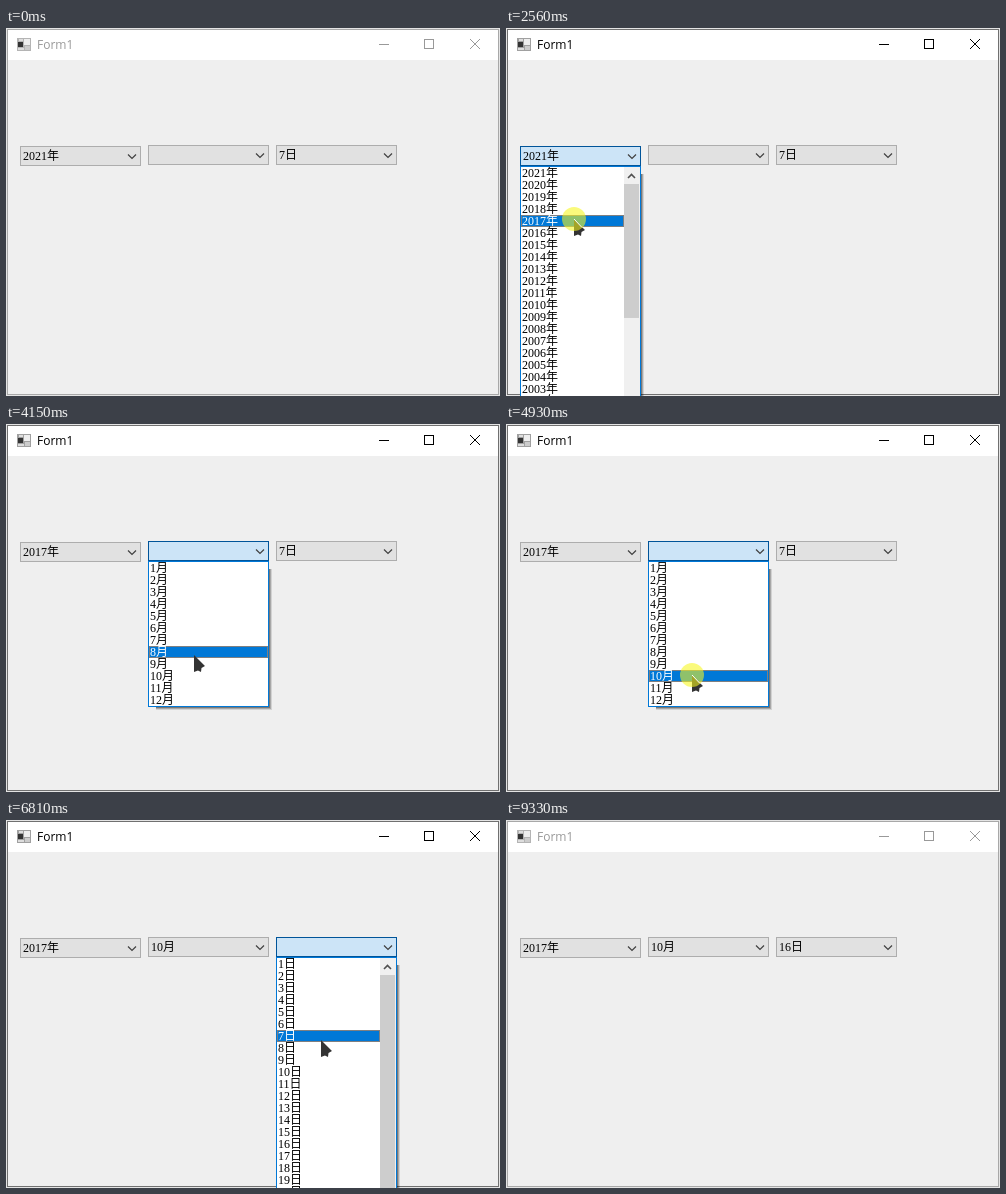
These frames come from a looping animation (494x368 px, 9.41 s). An HTML page with a canvas:

```html
<!DOCTYPE html>
<html lang="zh">
<head>
<meta charset="utf-8">
<title>Form1</title>
<style>
html, body { margin: 0; width: 100%; height: 100%; overflow: hidden; background: #efefef; }
canvas { display: block; width: 494px; height: 368px; }
</style>
</head>
<body>
<canvas id="stage" width="494" height="368"></canvas>
<script>
const g = document.getElementById('stage').getContext('2d');
const LOOP = 9410, ROW = 12, VISIBLE = 30, SLIDE = 200;
const BLUE = '#0078d7';
const TEXT_FONT = '12px "Liberation Serif", "Noto Sans CJK SC", "Noto Sans CJK", serif';
const TITLE_FONT = '12px "Open Sans", "Noto Sans", sans-serif';

const between = (t, from, to) => t >= from && t < to;
const items = (count, label) => Array.from({ length: count }, (_, i) => label(i));

const combos = [
  { x: 14, y: 118, items: items(73, i => 2021 - i + '年'), open: 1380, close: 2640, blur: 3270,
    text: t => t < 2640 ? '2021年' : '2017年', first: 0 },
  { x: 142, y: 117, items: items(12, i => i + 1 + '月'), open: 3270, close: 5010, blur: 6020,
    text: t => t < 5010 ? '' : '10月', first: -1 },
  { x: 270, y: 117, items: items(31, i => i + 1 + '日'), open: 5818, close: 7760, blur: 9330,
    text: t => t < 5010 ? '7日' : t < 7760 ? '' : '16日', first: -1 }
];

// Pointer stops: time, x, y
const path = [
  [160, 279, 306], [380, 158, 178], [540, 158, 178], [1000, 70, 128], [1380, 70, 128],
  [1780, 72, 216], [2030, 72, 216], [2170, 68, 191], [2640, 68, 191], [3040, 184, 127],
  [3600, 184, 127], [3970, 188, 231], [4150, 188, 231], [4450, 186, 251], [5010, 186, 251],
  [5640, 321, 129], [6280, 321, 129], [6500, 318, 195], [6650, 318, 195], [7210, 303, 320],
  [7760, 303, 320], [8150, 466, 250], [8230, 456, 208], [8390, 456, 208], [8780, 412, 370]
];
const clicks = [1300, 2560, 3190, 4930, 5738, 7680];

function pointerAt(t) {
  const i = path.findIndex(stop => stop[0] > t);
  if (i < 1) return null;
  const [t0, x0, y0] = path[i - 1], [t1, x1, y1] = path[i];
  const u = (t - t0) / (t1 - t0), k = u * u * (3 - 2 * u);
  return { x: x0 + (x1 - x0) * k, y: y0 + (y1 - y0) * k };
}

function box(x, y, w, h, color) {
  g.fillStyle = color;
  g.fillRect(x, y, w, h);
}

function frame(x, y, w, h, color, dash = []) {
  g.strokeStyle = color;
  g.lineWidth = 1;
  g.setLineDash(dash);
  g.strokeRect(x + .5, y + .5, w - 1, h - 1);
  g.setLineDash([]);
}

function line(points, color, width = 1) {
  g.strokeStyle = color;
  g.lineWidth = width;
  g.beginPath();
  points.forEach(([x, y]) => g.lineTo(x, y));
  g.stroke();
}

function write(text, x, y, color = '#000', font = TEXT_FONT) {
  g.font = font;
  g.fillStyle = color;
  g.fillText(text, x, y);
}

function drawWindow(active) {
  box(0, 0, 494, 368, '#e4e4e4');
  box(1, 1, 492, 366, '#efefef');
  box(2, 2, 490, 30, '#fff');
  frame(1, 1, 492, 366, active ? '#707070' : '#a8a8a8');

  box(11, 10, 14, 13, active ? '#a0a0a0' : '#b4b4b4');
  box(12, 14, 5, 5, '#333');
  box(13, 11, 4, 2, '#ddd');
  box(18, 11, 6, 6, '#eee');
  box(12, 20, 6, 2, '#ddd');
  box(19, 18, 5, 4, '#ccc');
  write('Form1', 31, 21, active ? '#000' : '#999', TITLE_FONT);

  const ink = active ? '#000' : '#999';
  box(373, 16, 10, 1, ink);
  frame(418, 11, 10, 10, ink);
  line([[464, 11], [474, 21]], ink);
  line([[474, 11], [464, 21]], ink);
}

function drawCombo(c, t, pointer) {
  const { x, y } = c;
  const pressed = between(t, c.open + 200, c.close + 200);
  const hover = between(t, c.open, c.close) || pointer &&
    between(pointer.x, x, x + 121) && between(pointer.y, y, y + 20);
  const [fill, edge] = pressed ? ['#cce4f7', '#005499'] : hover ? ['#e5f1fb', BLUE] : ['#e1e1e1', '#adadad'];
  box(x, y, 121, 20, fill);
  frame(x, y, 121, 20, edge);
  line([[x + 108, y + 8.5], [x + 112, y + 12.5], [x + 116, y + 8.5]], '#404040', 1.2);
  write(c.text(t), x + 3, y + 14);
  if (between(t, c.close, c.blur)) frame(x + 3, y + 3, 98, 14, '#000', [1, 1]);
}

function hoveredRow(c, t) {
  let row = c.first;
  for (let s = c.open; s <= t; s += 10) {
    const p = pointerAt(s);
    const i = Math.floor((p.y - c.y - 21) / ROW);
    if (i >= 0 && i < c.items.length) row = i;
  }
  return row;
}

function drawList(c, t) {
  if (!between(t, c.open, c.close)) return;
  const x = c.x, top = c.y + 20, rows = Math.min(VISIBLE, c.items.length);
  const height = rows * ROW + 2, progress = Math.min(1, (t - c.open) / SLIDE), sliding = progress < 1;
  const shown = sliding ? Math.max(0, progress * height - 33) : height;
  const scrolls = c.items.length > rows, width = scrolls ? 103 : 119;

  if (progress > .5) [.5, .3, .12].forEach((alpha, i) => {
    box(x + 121 + i, top + 8, 1, height - 7 + i, `rgba(0,0,0,${alpha})`);
    box(x + 8, top + height + i, 113 + i, 1, `rgba(0,0,0,${alpha})`);
  });

  g.save();
  g.beginPath();
  g.rect(x, top, 121, shown);
  g.clip();
  g.translate(0, Math.round((progress - 1) * height));
  box(x, top, 121, height, '#fff');
  const selected = hoveredRow(c, t);
  c.items.slice(0, rows).forEach((label, i) => {
    const y = top + 1 + i * ROW;
    if (i === selected) {
      box(x + 1, y, width, ROW, BLUE);
      frame(x + 1, y, width, ROW, '#ff8728', [1, 1]);
    }
    write(label, x + 2, y + 10, i === selected ? '#fff' : '#000');
  });
  if (scrolls) {
    box(x + 104, top + 1, 16, height - 2, '#f0f0f0');
    box(x + 104, top + 18, 15, (height - 36) * rows / c.items.length, '#cdcdcd');
    line([[x + 108, top + 12], [x + 111.5, top + 8.5], [x + 115, top + 12]], '#505050', 1.6);
  }
  if (sliding) box(x, top, 1, height, '#444');
  else frame(x, top, 121, height, BLUE);
  g.restore();
}

function drawPointer({ x, y }, clicking) {
  g.save();
  g.translate(x, y);
  g.fillStyle = '#333';
  g.beginPath();
  [[0, 0], [11, 11], [7.5, 13], [7, 17], [4, 15.5], [0, 17]].forEach(p => g.lineTo(...p));
  g.fill();
  if (clicking) {
    g.fillStyle = 'rgba(246,246,30,.58)';
    g.beginPath();
    g.arc(0, 0, 12, 0, 7);
    g.fill();
    line([[0, 0], [8, 8.5]], '#fff');
  }
  g.restore();
}

function draw(now) {
  const t = now % LOOP, pointer = pointerAt(t);
  drawWindow(between(t, 1300, 9330));
  combos.forEach(c => drawCombo(c, t, pointer));
  combos.forEach(c => drawList(c, t));
  if (pointer) drawPointer(pointer, clicks.some(start => between(t, start, start + 80)));
}

const start = performance.now();
function tick() {
  draw(performance.now() - start);
  requestAnimationFrame(tick);
}
tick();
</script>
</body>
</html>
```
